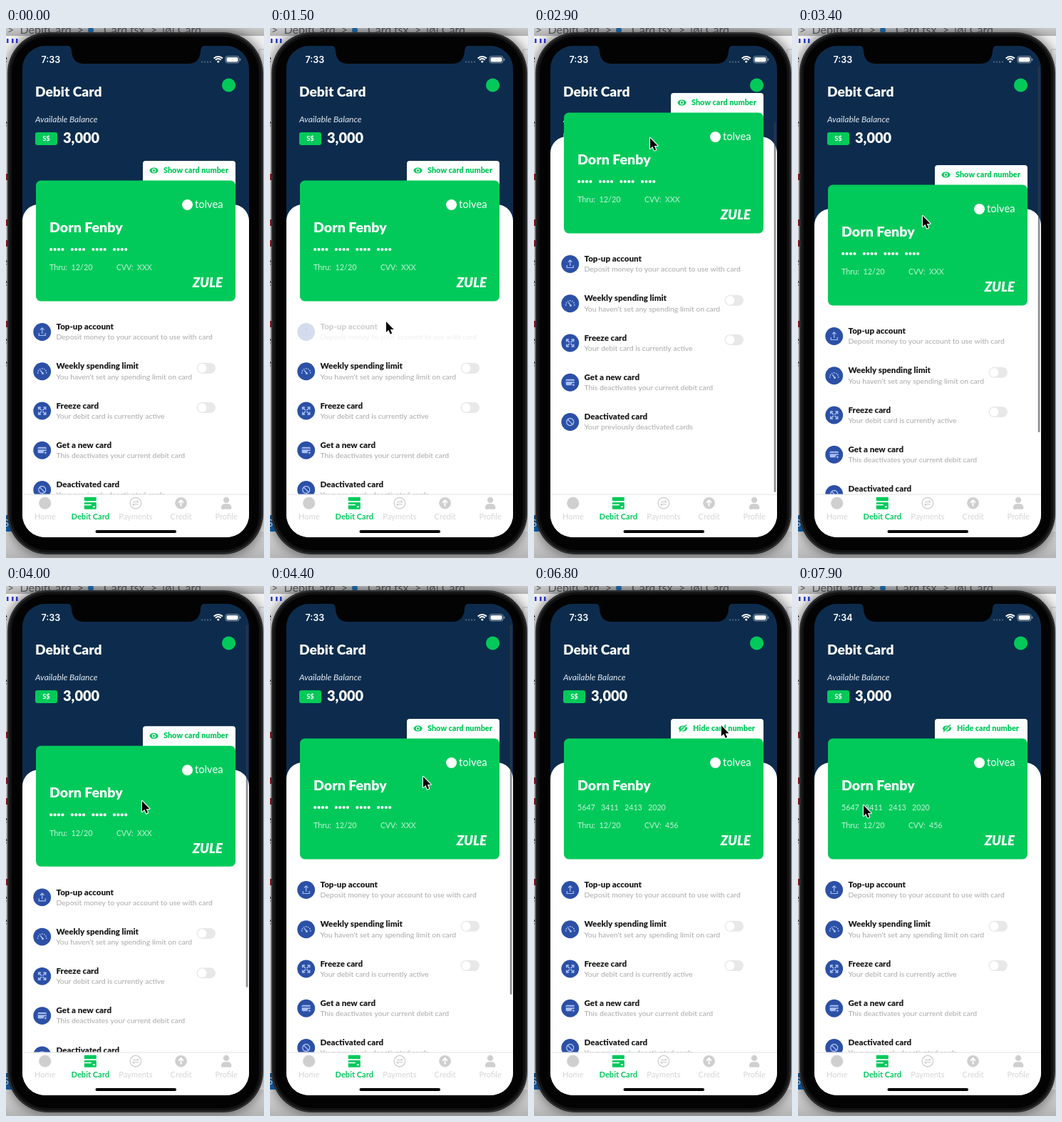
Animation of 362 by 742 pixels, one loop 8000 ms. Source, as an HTML page with a canvas:

```html
<!DOCTYPE html>
<html lang="en">
<head>
<meta charset="utf-8">
<title>Debit card screen</title>
<style>
html, body { margin: 0; width: 100%; height: 100%; overflow: hidden; background: #fff; }
canvas { display: block; width: 362px; height: 742px; }
</style>
</head>
<body>
<canvas id="stage"></canvas>
<script>
const W = 362, H = 742, LOOP = 8000;
const GREEN = '#02ca5a', NAVY = '#0d2c4d', BLUE = '#2b50a6', PALE = '#a9c0f3', GREY = '#cfcfcf';
const SANS = 'Lato, "Open Sans", sans-serif';
const canvas = document.getElementById('stage');
const g = canvas.getContext('2d');
const dpr = window.devicePixelRatio || 1;
canvas.width = W * dpr;
canvas.height = H * dpr;

const rows = [
  ['Top-up account', 'Deposit money to your account to use with card', false],
  ['Weekly spending limit', "You haven't set any spending limit on card", true],
  ['Freeze card', 'Your debit card is currently active', true],
  ['Get a new card', 'This deactivates your current debit card', false],
  ['Deactivated card', 'Your previously deactivated cards', false]
];

// time, x, y
const pointer = [
  [900, 372, 470], [1350, 163, 411], [1550, 163, 411], [2150, 163, 154], [2900, 163, 154],
  [3400, 175, 263], [3700, 186, 305], [3900, 188, 305], [4400, 215, 267], [4700, 222, 260],
  [5500, 264, 195], [6750, 264, 195], [7400, 196, 212], [7850, 92, 307]
];
// time, offset
const scrolling = [
  [1550, 0], [1850, 95], [2050, 124], [2550, 95], [2900, 95], [3400, -6], [3700, -24], [4250, 0]
];
const rowFade = [[1350, 1], [1500, .2], [1600, .2], [1850, 1]];
const buttonFade = [[6240, 1], [6300, .2], [6560, .2], [6800, 1]];
const barFade = [[1550, 0], [1650, 1], [4450, 1], [4750, 0]];

function track(keys, t) {
  if (t <= keys[0][0]) return keys[0].slice(1);
  for (let i = 1; i < keys.length; i++) {
    const a = keys[i - 1], b = keys[i];
    if (t < b[0]) {
      const p = (t - a[0]) / (b[0] - a[0]);
      const e = p * p * (3 - 2 * p);
      return a.slice(1).map((v, k) => v + (b[k + 1] - v) * e);
    }
  }
  return keys[keys.length - 1].slice(1);
}

function box(x, y, w, h, r, color) {
  g.beginPath();
  g.roundRect(x, y, w, h, r);
  g.fillStyle = color;
  g.fill();
}

function disc(x, y, r, color) {
  g.beginPath();
  g.arc(x, y, r, 0, Math.PI * 2);
  g.fillStyle = color;
  g.fill();
}

function ring(x, y, r, color, width) {
  g.beginPath();
  g.arc(x, y, r, 0, Math.PI * 2);
  stroke(color, width);
}

function stroke(color, width) {
  g.strokeStyle = color;
  g.lineWidth = width;
  g.stroke();
}

function line(points, color, width = 1.2) {
  g.beginPath();
  for (let i = 0; i < points.length; i += 2) g.lineTo(points[i], points[i + 1]);
  stroke(color, width);
}

function text(s, x, y, size, color, style = '400', align = 'left', family = SANS) {
  g.font = `${style} ${size}px ${family}`;
  g.textAlign = align;
  g.fillStyle = color;
  g.fillText(s, x, y);
}

function at(x, y, draw) {
  g.save();
  g.translate(x, y);
  draw();
  g.restore();
}

function faded(alpha, draw) {
  g.save();
  g.globalAlpha *= alpha;
  draw();
  g.restore();
}

function desktop() {
  g.fillStyle = '#f4f4f4';
  g.fillRect(0, 0, W, H);
  const top = g.createLinearGradient(0, 0, 0, 16);
  top.addColorStop(0, '#c9c9c9');
  top.addColorStop(1, '#a9a9a9');
  g.fillStyle = top;
  g.fillRect(0, 0, W, 11);
  text('>  DebitCard  >', 2, 8, 16, '#55585c');
  disc(119, 3, 4, '#2476b8');
  text('Card.tsx  >', 137, 8, 16, '#55585c');
  text('[ø] Card', 219, 8, 16, '#55585c');
  g.fillStyle = '#2a3bd0';
  for (const x of [1, 8, 14]) g.fillRect(x, 15, 2.5, 6);
  line([362, 30, 355, 30, 355, 60], '#c4c4c4', 1);
  for (const y of [208, 272, 301, 414]) {
    g.fillStyle = '#b3202b';
    g.fillRect(0, y - 4, 2, 9);
  }
  for (const y of [48, 138, 332, 361, 442, 474]) text('e', -6, y, 15, '#222');
  box(0, 682, 24, 23, 0, '#1667b4');
  text('S', -3, 698, 13, '#fff');
  const low = g.createLinearGradient(0, 705, 0, H);
  low.addColorStop(0, '#dedede');
  low.addColorStop(1, '#b4b4b4');
  g.fillStyle = low;
  g.fillRect(0, 705, W, H - 705);
}

function phone() {
  g.save();
  g.shadowColor = 'rgba(0,0,0,.6)';
  g.shadowBlur = 18 * dpr;
  box(2, 6, 359, 731, 57, '#2b2c2e');
  g.restore();
  box(4.5, 8.5, 354, 726, 55, '#121213');
  box(8, 12, 347, 719, 51, '#030303');
}

function header() {
  g.fillStyle = NAVY;
  g.fillRect(23, 25, 318, 688);
  text('Debit Card', 41, 96.3, 19.2, '#fff', '900');
  disc(312.5, 80, 9.5, GREEN);
  text('Available Balance', 41, 132, 12, '#e3e8ee', 'italic 400');
  box(41, 146, 31, 18, 3, GREEN);
  text('S$', 56.5, 158.4, 9.5, '#fff', '700', 'center');
  text('3,000', 80, 160.8, 20, '#fff', '900');
}

function eye(x, y, hidden) {
  g.beginPath();
  g.ellipse(x, y, 6, 4, 0, 0, Math.PI * 2);
  g.fillStyle = GREEN;
  g.fill();
  ring(x, y, 2.2, '#fff', 1.1);
  if (hidden) {
    line([x - 4.5, y + 5.5, x + 5.5, y - 4.5], '#fff', 1.2);
    line([x - 5, y + 4.5, x + 4.8, y - 5.3], GREEN, 1.3);
  }
}

function cardButton(shown) {
  box(192, 186, 130, 40, [4, 4, 0, 0], '#fff');
  eye(shown ? 209 : 207.5, 199.5, shown);
  text(shown ? 'Hide card number' : 'Show card number', shown ? 223 : 221, 202.6, 10.8, GREEN, '900');
}

function card(shown) {
  box(42, 213.5, 280, 169, 7, GREEN);
  disc(254.5, 247.5, 7.5, '#fff');
  text('tolvea', 265, 251.5, 14.7, '#fff');
  text('Dorn Fenby', 61, 286, 19.6, '#fff', '900');
  const soft = 'rgba(255,255,255,.76)';
  const groups = ['5647', '3411', '2413', '2020'];
  groups.forEach((digits, i) => {
    if (shown) text(digits, 61 + i * 33, 313.6, 10.7, soft);
    else for (let k = 0; k < 4; k++) disc(63.2 + i * 29.6 + k * 5.4, 310, 2.1, '#fff');
  });
  text('Thru:  12/20', 61, 339.3, 10.8, soft);
  text(shown ? 'CVV:  456' : 'CVV:  XXX', 155, 339.3, 10.5, soft);
  text('ZULE', 304, 363.3, 18.5, '#fff', 'italic 900', 'right');
}

const rowIcons = [
  () => {
    line([0, 2.5, 0, -5.5], PALE);
    line([-2.8, -2.8, 0, -5.6, 2.8, -2.8], PALE);
    line([-4.5, 1.5, -4.5, 5, 4.5, 5, 4.5, 1.5], PALE);
  },
  () => {
    for (let i = 0; i < 7; i++) {
      const a = Math.PI * (1 + i / 6);
      disc(6 * Math.cos(a), 2 + 6 * Math.sin(a), .9, PALE);
    }
    line([-2.5, -1.5, 1, 3], PALE, 1.4);
    disc(.8, 2.8, 1.5, PALE);
  },
  () => {
    for (let i = 0; i < 4; i++) {
      g.rotate(Math.PI / 2);
      line([.8, .8, 5, 5], PALE, 1.6);
      line([5, 1.6, 5, 5, 1.6, 5], PALE, 1.5);
    }
  },
  () => {
    box(-6, -4.5, 12, 8.5, 1.4, PALE);
    box(-6, -2.6, 12, 1.6, 0, BLUE);
    disc(4.6, 3.4, 2.8, BLUE);
    line([4.6, 1.6, 4.6, 5.2], PALE, 1);
    line([2.8, 3.4, 6.4, 3.4], PALE, 1);
  },
  () => {
    ring(0, 0, 5, PALE, 1.3);
    line([-3.5, -3.5, 3.5, 3.5], PALE, 1.3);
  }
];

function row([title, note, toggle], i) {
  at(0, i * 55.25, () => {
    disc(50.7, 425.5, 12.4, BLUE);
    at(50.7, 425.5, rowIcons[i]);
    text(title, 70.5, 422.2, 11.55, '#1c1c1c', '900');
    text(note, 70.5, 436.3, 10.4, '#a9a9a9');
    if (toggle) {
      box(267.5, 413.5, 26.5, 15, 7.5, '#e8e8e8');
      disc(275.2, 421, 6.2, '#fff');
    }
  });
}

function scrollBar(offset, alpha) {
  const over = offset < 0 ? -offset : Math.max(0, offset - 95);
  const y = 54 + Math.min(95, Math.max(0, offset)) * .82 + (offset > 95 ? over : 0);
  faded(alpha, () => box(336.8, y, 2.6, 518 - over, 1.3, 'rgba(56,62,70,.6)'));
}

const tabIcons = [
  () => disc(0, 0, 8.5, GREY),
  () => {
    box(-8.5, -8.5, 17, 5.5, 1, GREEN);
    box(-8.5, -1.2, 17, 9.7, 1, GREEN);
    box(-8.5, 1.5, 10, 1.6, 0, '#fff');
    box(3.5, 4, 3, 2, 0, '#fff');
  },
  () => {
    ring(0, 0, 7.8, GREY, 1.3);
    line([-4, -1.5, 4, -1.5, 1.8, -3.8], GREY, 1.2);
    line([4, 1.5, -4, 1.5, -1.8, 3.8], GREY, 1.2);
  },
  () => {
    disc(0, 0, 8.3, GREY);
    line([0, 4.5, 0, -4], '#fff', 1.8);
    line([-3.6, -.5, 0, -4.2, 3.6, -.5], '#fff', 1.8);
  },
  () => {
    disc(0, -4.3, 4.2, GREY);
    box(-7.2, 1, 14.4, 7.5, [5, 5, 1.5, 1.5], GREY);
  }
];

function tabBar() {
  g.fillStyle = '#fff';
  g.fillRect(23, 653, 318, 60);
  line([23, 653, 341, 653], '#e2e2e2', 1);
  ['Home', 'Debit Card', 'Payments', 'Credit', 'Profile'].forEach((name, i) => {
    const x = 54.7 + i * 63.6, on = i === 1;
    at(x, 665.2, tabIcons[i]);
    text(name, x, 687.6, 11.1, on ? GREEN : '#d6d6d6', on ? '700' : '400', 'center');
  });
  box(125.5, 703, 113.5, 4, 2, '#000');
}

function statusBar(clock) {
  g.beginPath();
  g.moveTo(85, 24);
  g.quadraticCurveTo(92, 25, 92, 32);
  g.quadraticCurveTo(93, 50, 110, 50);
  g.lineTo(255, 50);
  g.quadraticCurveTo(272, 50, 273, 32);
  g.quadraticCurveTo(273, 25, 280, 24);
  g.fillStyle = '#030303';
  g.fill();
  text(clock, 49.5, 48.6, 12.6, '#fff', '600', 'left', 'Inter, sans-serif');
  for (let i = 0; i < 4; i++) disc(275 + i * 4, 47.5, 1, 'rgba(255,255,255,.35)');
  for (const r of [8.6, 5.4]) {
    g.beginPath();
    g.arc(297.8, 48.5, r, -Math.PI * .75, -Math.PI * .25);
    stroke('#fff', 2);
  }
  disc(297.8, 47, 1.6, '#fff');
  g.beginPath();
  g.roundRect(308, 39.5, 19, 9.4, 2.8);
  stroke('rgba(255,255,255,.5)', 1);
  box(309.5, 41, 16, 6.4, 1.6, '#fff');
  box(328, 42.6, 1.3, 3.2, .6, 'rgba(255,255,255,.5)');
}

function cursor(x, y) {
  at(x, y, () => {
    g.beginPath();
    [[0, 0], [0, 15], [3.4, 11.8], [5.8, 17.4], [8.2, 16.4], [5.8, 11], [10.6, 11]]
      .forEach(p => g.lineTo(...p));
    g.closePath();
    g.lineJoin = 'round';
    stroke('#fff', 2.2);
    g.fillStyle = '#000';
    g.fill();
  });
}

function screen(t) {
  const [offset] = track(scrolling, t);
  const shown = t >= 6600;
  g.save();
  g.beginPath();
  g.roundRect(23, 25, 318, 688, 32);
  g.clip();
  header();
  at(0, -offset, () => {
    box(23, 247, 318, 700, [23, 23, 0, 0], '#fff');
    faded(track(buttonFade, t)[0], () => cardButton(shown));
    card(shown);
    rows.forEach((r, i) => faded(i ? 1 : track(rowFade, t)[0], () => row(r, i)));
  });
  scrollBar(offset, track(barFade, t)[0]);
  tabBar();
  statusBar(t < 7000 ? '7:33' : '7:34');
  g.restore();
}

function frame(now) {
  const t = now % LOOP;
  g.setTransform(dpr, 0, 0, dpr, 0, 0);
  desktop();
  phone();
  screen(t);
  if (t > 900) cursor(...track(pointer, t));
  requestAnimationFrame(frame);
}
requestAnimationFrame(frame);
</script>
</body>
</html>
```
